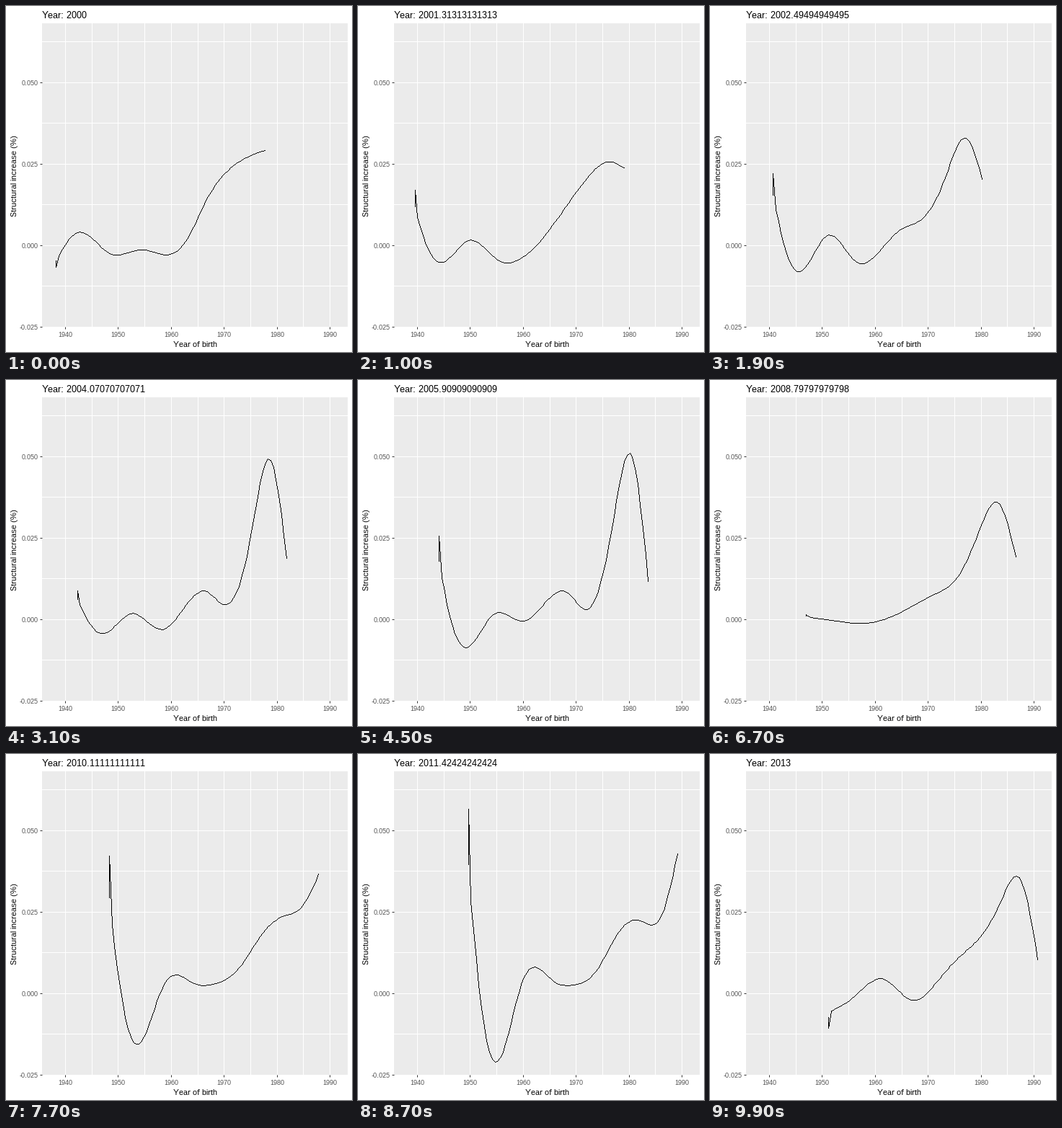
Recreate the animation shown at these times as a matplotlib script. Size 480x480 px, loop 10 s.

```python
import numpy as np
import matplotlib.pyplot as plt
from matplotlib.animation import FuncAnimation
from matplotlib.collections import LineCollection

SIZE, DPI, STEPS = 480, 100, 100
PT = 72 / DPI  # points per pixel

plt.rcParams.update({
    "font.family": ["Liberation Sans", "DejaVu Sans"],
    "text.hinting": "default",
    "text.hinting_factor": 1,
})

# Plot area and scale, in pixels
LEFT, BOTTOM, WIDTH, HEIGHT = 50, 35.05, 424, 420.95
PER_YEAR, PER_UNIT = 7.345, 113 / 0.025
X_MIN, Y_MIN = 1940 - 31.95 / PER_YEAR, -0.025

# Each pose: heights in 1e-4 at a few cohort ages, joined by a spline
AGES = np.arange(0.5, 39.6, 0.5)
KNOTS = np.array([.5, 2, 4.8, 10.2, 16, 20, 24.3, 28.2, 32.5, 36.4, 39.5])
rise, wave, peak, crest, calm, plunge, final = np.array([
    [-33, 9, 41, -25, -13, -27, 8, 134, 231, 274, 293],
    [111, 4, -80, 31, -53, -19, 51, 83, 208, 330, 204],
    [44, -4, -43, 19, -30, 33, 87, 46, 235, 492, 188],
    [128, 9, -85, 15, -4, 52, 82, 33, 268, 501, 117],
    [8, 4, -2, -12, 9, 41, 79, 123, 268, 356, 193],
    [283, 24, -208, 38, 39, 27, 73, 184, 224, 237, 429],
    [-53, -41, -9, 45, -21, 28, 107, 166, 283, 345, 104],
])
POSES = {
    0: rise,
    15: 1.5 * wave - 0.5 * peak,
    19: wave,
    31: peak,
    45: crest,
    67: calm,
    76: 0.3 * calm + 0.7 * plunge,
    84: plunge,
    91: plunge,
    99: final,
}


def spline(t, y, x):
    """Natural cubic spline through (t, y), evaluated at x."""
    h = np.diff(t)
    slope = np.diff(y) / h
    a = np.eye(len(t))
    b = np.zeros(len(t))
    for k in range(1, len(t) - 1):
        a[k, k - 1:k + 2] = h[k - 1], 2 * (h[k - 1] + h[k]), h[k]
        b[k] = 6 * (slope[k] - slope[k - 1])
    m = np.linalg.solve(a, b)
    k = np.clip(np.searchsorted(t, x) - 1, 0, len(t) - 2)
    u, v = x - t[k], t[k + 1] - x
    return ((m[k] * v**3 + m[k + 1] * u**3) / (6 * h[k])
            + (y[k] / h[k] - m[k] * h[k] / 6) * v
            + (y[k + 1] / h[k] - m[k + 1] * h[k] / 6) * u)


def curve(step):
    """Birth years and heights of the curve."""
    heights = [np.interp(step, list(POSES), col)
               for col in zip(*POSES.values())]
    body = spline(KNOTS, np.array(heights), AGES)
    # the oldest cohort jumps to twice its neighbour's height
    tip = 2 * body[0]
    born = 1938.22 + 13 * step / (STEPS - 1)
    x = born + np.concatenate([[0, 0], AGES])
    return x, np.concatenate([[0.7 * tip, tip], body]) * 1e-4


def to_pixels(x, y):
    """Whole pixel column and row, rows counted from the top."""
    return (np.rint(LEFT + (x - X_MIN) * PER_YEAR).astype(int),
            np.rint(SIZE - BOTTOM - (y - Y_MIN) * PER_UNIT).astype(int))


def trace(x, y):
    """One-pixel dashes that form a crisp, unsmoothed line."""
    cols, rows = to_pixels(x, y)
    steps = np.maximum(abs(np.diff(cols)), abs(np.diff(rows)))
    at = np.concatenate([[0], np.cumsum(steps)])
    i = np.arange(at[-1] + 1)
    c = np.floor(np.interp(i, at, cols) + 0.5)
    r = SIZE - np.floor(np.interp(i, at, rows) + 0.5) - 0.5
    return np.stack([np.column_stack([c, r]),
                     np.column_stack([c + 1, r])], axis=1)


fig = plt.figure(figsize=(SIZE / DPI, SIZE / DPI), dpi=DPI, facecolor="white")
ax = fig.add_axes([v / SIZE for v in (LEFT, BOTTOM, WIDTH, HEIGHT)],
                  facecolor="#EBEBEB")
ax.set_xlim(X_MIN, X_MIN + WIDTH / PER_YEAR)
ax.set_ylim(Y_MIN, Y_MIN + HEIGHT / PER_UNIT)

decades = range(1940, 1991, 10)
levels = [-0.025, 0, 0.025, 0.05]
ax.set_xticks(decades, labels=[])
ax.set_yticks(levels, labels=[])
ax.set_xticks(range(1945, 1990, 10), minor=True)
ax.set_yticks([v + 0.0125 for v in levels], minor=True)
ax.tick_params(which="major", length=3 * PT, width=PT, color="#333333")
ax.tick_params(which="minor", length=0)
ax.grid(True, which="both", color="white", linewidth=PT)
ax.set_axisbelow(True)
ax.spines[:].set_visible(False)


def label(x, y, text, size, **style):
    """Text at stage pixels, measured from the top left."""
    style = {"va": "baseline", "ha": "center", "color": "black", **style}
    return fig.text(x / SIZE, 1 - y / SIZE, text, fontsize=size * PT, **style)


for x in decades:
    label(to_pixels(x, 0)[0], 459, str(x), 9, color="#4D4D4D")
for y in levels:
    label(45, to_pixels(0, y)[1] + 4, f"{y:.3f}", 9, ha="right",
          color="#4D4D4D")
label(262, 473, "Year of birth", 11)
label(17.5, 235.5, "Structural increase (%)", 11, rotation=90,
      va="center", ha="right")
title = label(50, 17, "", 13, ha="left")

line = LineCollection([], colors="black", linewidths=PT, capstyle="butt",
                      transform=None)
line.set_snap(False)
fig.add_artist(line)


def draw(step):
    line.set_segments(trace(*curve(step)))
    title.set_text(f"Year: {2000 + 13 * step / (STEPS - 1):.15g}")
    return line, title


anim = FuncAnimation(fig, draw, frames=STEPS, interval=100,
                     repeat=True, repeat_delay=0, blit=False)
plt.show()
```
